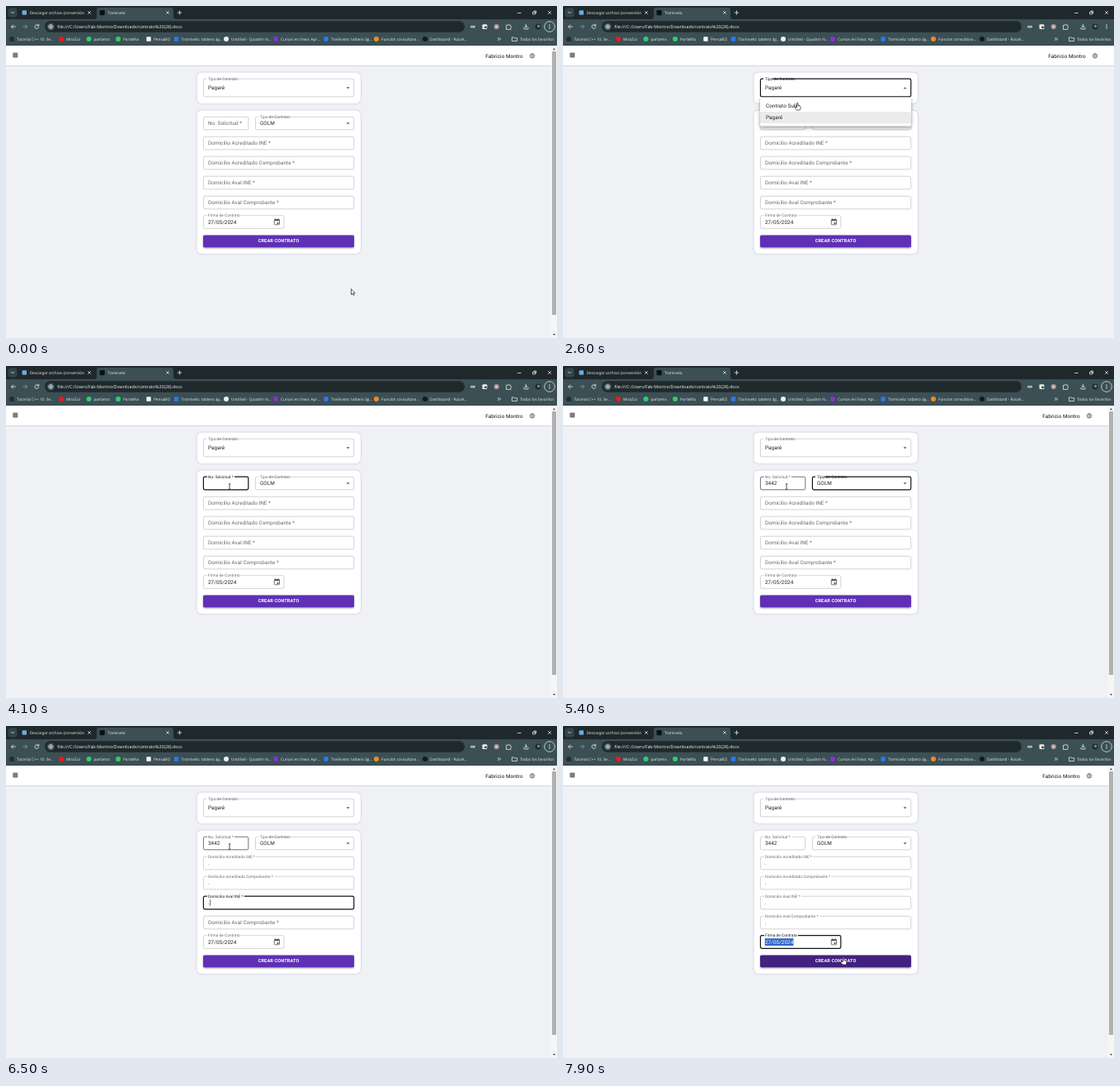
Animation, 668 px wide and 402 px high, one loop 8 s. Source, as an HTML page:

```html
<!DOCTYPE html>
<html lang="es">
<head>
<meta charset="utf-8">
<title>Contrato</title>
<style>
  html, body { margin: 0; width: 100%; height: 100%; overflow: hidden; background: #f0f1f5; }
  svg { display: block; width: 100%; height: 100%; }
  text { font-family: Roboto, sans-serif; letter-spacing: .0094em; text-rendering: geometricPrecision; white-space: pre; }
  .chrome text { font-family: "Open Sans", "Noto Sans", sans-serif; letter-spacing: 0; }
  .line { fill: none; stroke: #e8eded; stroke-width: .8; stroke-linecap: round; stroke-linejoin: round; }
  .card { fill: #fff; filter: drop-shadow(0 0 1.2px #9aa3b8aa); }
  .menu { fill: #fff; filter: drop-shadow(0 2px 2px #0006); }
  .button { filter: drop-shadow(0 1px 1px #0006); }
  .halo { paint-order: stroke; stroke: #fff; stroke-width: 3px; stroke-linejoin: round; }
  .pointer { fill: #fff; stroke: #222; stroke-width: .7; stroke-linejoin: round; }
</style>
</head>
<body>
<svg viewBox="0 0 668 402">
  <g class="chrome" id="chrome"></g>
  <g id="page"></g>
</svg>
<script>
const LOOP = 8000, STEP = 100;
const BODY = 6.33, SMALL = 4.75;

const text = (x, y, str, size, fill, extra = '') =>
  `<text x="${x}" y="${y}" font-size="${size}" fill="${fill}" ${extra}>${str}</text>`;
const rect = (x, y, w, h, fill, extra = '') =>
  `<rect x="${x}" y="${y}" width="${w}" height="${h}" fill="${fill}" ${extra}/>`;
const circle = (x, y, r, fill, extra = '') =>
  `<circle cx="${x}" cy="${y}" r="${r}" fill="${fill}" ${extra}/>`;
const line = (d, extra = '') => `<path class="line" d="${d}" ${extra}/>`;
const cross = (x, y, r) => line(`M${x - r} ${y - r}l${2 * r} ${2 * r}m0 ${-2 * r}l${-2 * r} ${2 * r}`);
const dots = (x, y, dx, dy, fill) =>
  [-1, 0, 1].map(i => circle(x + i * dx, y + i * dy, .65, fill)).join('');
const within = (t, span) => !!span && t >= span[0] && t < span[1];
const clamp = v => Math.max(0, Math.min(1, v));
const mix = (a, b, k) => a + (b - a) * k;

// Browser window

const bookmarks = [
  [7, 'Tutorial C++ 10. Se...', '#1f2b35', 1],
  [67, 'MiraZul', '#f01818'],
  [100.5, 'parlamix', '#2ad366'],
  [136, 'ParlaMix', '#2ad366'],
  [173, 'PensaBO', '#f4f4f4', 1],
  [206.5, 'Tramivelo: tablero ág...', '#2979f2', 1],
  [267, 'Untitled - Quadrin N...', '#f0f0f0'],
  [327, 'Cursos en línea: Apr...', '#8b2ee0', 1],
  [388, 'Tramivelo: tablero ág...', '#2979f2', 1],
  [449, 'Funcion consultora...', '#f08a24'],
  [508, 'Dashboard - RutaK...', '#16191b'],
];

function drawChrome() {
  const ink = '#e8eded';
  const mark = ([x, label, color, square]) =>
    (square ? rect(x - 2.7, 37.3, 5.4, 5.4, color, 'rx=".8"') : circle(x, 40, 3, color)) +
    text(x + 6, 41.7, label, 4.75, ink);
  return [
    rect(0, 0, 668, 17, '#1f282b'),
    rect(0, 16, 668, 32, '#3b4f54'),
    rect(2.5, 2.5, 11, 11, '#33454a', 'rx="3"'),
    line('M6.4 7.2l1.6 1.6l1.6-1.6'),
    rect(19.5, 5.2, 5.5, 5.5, '#6fa8dc', 'rx="1"'),
    text(28.5, 9.9, 'Descargar archivo (conversión', 4.75, ink),
    cross(101, 8, 1.4),
    '<path d="M107 16q3 0 3-3V5q0-3 3-3h87q3 0 3 3v8q0 3 3 3z" fill="#3b4f54"/>',
    rect(113.5, 5, 6.2, 6.2, '#0d1012', 'rx="1"'),
    text(123, 9.9, 'Tramivelo', 4.75, ink),
    cross(196, 8, 1.4),
    line('M208.3 8h4.4m-2.2-2.2v4.4'),
    line('M620.5 8.5h3.6'),
    line('M639 7.3h2.6v2.6h-2.6zM640 7v-.9h2.7v2.7h-.8', 'stroke-width=".6"'),
    cross(659, 8, 1.6),
    line('M11.5 25h-5m2.2-2.2l-2.2 2.2l2.2 2.2'),
    line('M20.5 25h5m-2.2-2.2l2.2 2.2l-2.2 2.2', 'opacity=".45"'),
    line('M39.4 23.8a2.4 2.4 0 1 0 .2 2M39.7 22v2h-2'),
    rect(47, 18.3, 509, 13.4, '#1f292c', 'rx="6.7"'),
    circle(54.3, 25, 4.6, '#3b4f54'),
    circle(54.3, 25, 2.4, 'none', 'stroke="#e8eded" stroke-width=".6"'),
    line('M52 25h4.6M54.3 22.7v4.6', 'stroke-width=".4"'),
    text(62.3, 26.9, 'file:///C:/Users/Fab-Montro/Downloads/contrato%20(28).docx', 5.31, '#f3f6f6'),
    rect(563, 23.7, 6, 2.8, '#a9b5b8', 'rx="1"'),
    rect(577.5, 22.3, 5.8, 5.6, '#eef1f1', 'rx="1"'),
    rect(580.2, 24.6, 2.4, 2.4, '#2a3639'),
    circle(594.7, 25, 3.1, '#a99a92'),
    circle(594.7, 25, 1.3, '#d9d2cc'),
    line('M606.8 23.3h1.6a1 1 0 0 1 2 0h1.5v1.7a1 1 0 0 1 0 1.8v1.5h-5.1z', 'stroke-width="1"'),
    line('M630.5 22v3.8m-1.7-1.6l1.7 1.7l1.7-1.7M628 26.2v1.7h5v-1.7'),
    circle(645, 25, 3.4, '#222b2e'),
    circle(645.5, 24.4, 1.6, '#8b8378'),
    dots(659, 25, 0, 2, ink),
    ...bookmarks.map(mark),
    line('M596.3 38.6l1.4 1.4l-1.4 1.4m2-2.8l1.4 1.4l-1.4 1.4', 'stroke-width=".7"'),
    line('M613.8 38h2l.8.8h3v3.6h-5.8z', 'stroke-width=".7"'),
    text(623, 41.7, 'Todos los favoritos', 4.75, ink),
  ].join('');
}

// Form

const fields = [
  { x: 239, y: 88, w: 183, h: 22, label: 'Tipo de Contrato', value: 'Pagaré', select: true,
    focus: [2200, 3600], hover: [1900, 3100] },
  { x: 239, y: 134, w: 55, label: 'No. Solicitud *', focus: [3600, 5300], hover: [3300, 7500],
    typed: [[4400, '3'], [4600, '34'], [4900, '344'], [5000, '3442']] },
  { x: 302, y: 134, w: 120, label: 'Tipo de Contrato', value: 'GOLM', select: true, focus: [5300, 5700] },
  { x: 239, y: 158, w: 183, label: 'Domicilio Acreditado INE *', focus: [5700, 6000], typed: [[5900, '.']] },
  { x: 239, y: 182, w: 183, label: 'Domicilio Acreditado Comprobante *', focus: [6000, 6300], typed: [[6200, '.']] },
  { x: 239, y: 206, w: 183, label: 'Domicilio Aval INE *', focus: [6300, 6600], typed: [[6500, '.']] },
  { x: 239, y: 230, w: 183, label: 'Domicilio Aval Comprobante *', focus: [6600, 7000], typed: [[6800, '.']] },
  { x: 239, y: 253.5, w: 98, label: 'Firma de Contrato', value: '27/05/2024', date: true, focus: [7000, LOOP] },
];
const caretOffset = { '': 0, '.': 1.8 };
const modal = [2200, 3000];

function drawField(f, t) {
  const { x, y, w, h = 16 } = f;
  const focused = within(t, f.focus), hovered = within(t, f.hover);
  const mid = y + h / 2, tx = x + 6;
  const edge = focused ? '#151515' : hovered ? '#505050' : '#c8c8c8';
  let out = rect(x + .4, y + .2, w - .6, h - .4, 'none',
    `rx="1.7" stroke="${edge}" stroke-width="${focused ? 1.2 : .8}"`);

  const raised = f.value ? 1 : clamp((t - f.focus[0] + STEP) / 300);
  const ink = focused ? '#151515' : '#686868';
  if (f.select) out += rect(x + 4, y - 1, 11, 2.4, '#fff');
  out += text(tx, mix(mid + 2.2, y + 1.6, raised), f.label, mix(BODY, SMALL, raised), ink,
    raised && !f.select ? 'class="halo"' : '');

  const entry = (f.typed || []).filter(([at]) => t >= at).pop();
  const value = f.value || (entry ? entry[1] : '');
  if (f.date && focused) out += rect(tx - .3, mid - 4.3, 34.7, 8.8, '#2f66c8');
  if (value) out += text(tx, mid + 2.2, value, BODY, f.date && focused ? '#fff' : '#222');
  if (f.typed && focused) {
    const since = t - (entry ? entry[0] : f.focus[0]);
    const cx = tx + .3 + (caretOffset[value] ?? value.length * 3.62);
    if (since % 1000 < 500) out += rect(cx, mid - 3.8, .6, 7.6, '#111');
  }
  if (f.select) {
    const flip = h > 16 && within(t, modal) ? -1 : 1;
    out += `<path d="M-2-1h4l-2 2z" fill="#555" transform="translate(${x + w - 7.3} ${mid + .3}) scale(1 ${flip})"/>`;
  }
  if (f.date) {
    out += rect(325.3, 258.6, 6.2, 6.2, 'none', 'rx=".6" stroke="#555" stroke-width=".8"') +
      rect(325.3, 258.4, 6.2, 1.8, '#555') + rect(328.6, 262, 1.9, 1.9, '#555') +
      line('M326.8 257.6v1M330 257.6v1', 'style="stroke:#555"');
  }
  return out;
}

function drawHeader(shift) {
  const teeth = [...Array(8)].map((_, i) =>
    `<path d="M0-2.3v-.9" stroke="#444" stroke-width="1.1" transform="rotate(${i * 45})"/>`).join('');
  return rect(0, 72, 668, .8, '#cfd1d6') + rect(0, 48, 668, 24, '#fff') +
    rect(8.3, 56.6, 6, 6, '#757575', 'rx=".8"') +
    rect(8.8, 58.3, 5, .4, '#a5a5a5') + rect(8.8, 60.5, 5, .4, '#a5a5a5') +
    text(581.3 + shift, 62.5, 'Fabricio Montro', BODY, '#111') +
    `<g transform="translate(${638 + shift} 60.3)">${teeth}` +
    circle(0, 0, 2.2, 'none', 'stroke="#444" stroke-width=".7"') + circle(0, 0, .8, '#444') + '</g>';
}

const drawScrollbar = () => rect(661, 48, 7, 354, '#f6f6f6') +
  rect(662, 55, 5, 319, '#b0b0b0') +
  '<path d="M662.8 53l1.7-2l1.7 2zM662.8 397l1.7 2l1.7-2z" fill="#555"/>';

function drawMenu(t) {
  const alpha = Math.min(clamp((t - 2100) / 200), clamp((3100 - t) / 200));
  if (!alpha) return '';
  return `<g opacity="${alpha}">` +
    rect(239, 110.5, 183, 35, '#fff', 'class="menu" rx="1.6"') +
    rect(239, 128, 183, 14, '#ebebeb') +
    text(246, 122.8, 'Contrato Sube', BODY, '#222') +
    text(246, 137.2, 'Pagaré', BODY, '#222') + '</g>';
}

// Pointer: time, x, y of the hot spot

const route = [
  [0, 418.5, 342.5], [400, 417.5, 323], [1000, 417.5, 323], [1400, 446, 225], [1800, 424, 124],
  [1900, 291.8, 104.6], [2300, 290, 105.5], [2600, 284.2, 117], [2800, 272, 132], [3000, 268, 134],
  [3300, 270, 143], [3600, 271, 146], [7400, 271, 146], [7500, 282, 168], [7700, 327, 250],
  [7800, 338, 277], [7900, 340, 280], [LOOP, 340, 280],
];
const shapes = {
  arrow: 'M0 0v7l1.6-1.4l1.1 2.3l1-.5l-1-2.2h2.1z',
  hand: 'M-.7.6q.7-1 1.4 0v3l2.5.6q.9.3.7 1.4l-.5 2.6q-.2.8-.8.8h-3q-.8 0-1.2-.7l-1.8-2.6q.2-1.1 1.3-.5l1.4.8z',
};

function drawPointer(t) {
  const i = route.findIndex(p => p[0] > t);
  const [a, b] = [route[i - 1], route[i]];
  const k = (t - a[0]) / (b[0] - a[0]);
  const at = `transform="translate(${mix(a[1], b[1], k)} ${mix(a[2], b[2], k)})"`;
  if (t >= 3200 && t < 7700) {
    return `<path d="M-1.3-3.4q1.3 0 1.3.8v5.2q0 .8-1.3.8M1.3-3.4q-1.3 0-1.3.8m0 5.2q0 .8 1.3.8" fill="none" stroke="#222" stroke-width=".8" ${at}/>`;
  }
  const hand = (t >= 1900 && t < 3200) || t >= 7800;
  return `<path class="pointer" d="${hand ? shapes.hand : shapes.arrow}" ${at}/>`;
}

function drawPage(t) {
  const open = within(t, modal);
  const pressed = t >= 7800;
  return [
    rect(0, 48, 668, 354, '#f0f1f5'),
    drawHeader(open ? 7 : 0),
    open ? '' : drawScrollbar() +
      circle(659, 25, 6.3, 'none', 'stroke="#c3dbe2" stroke-width=".9"'),
    rect(231.5, 80.5, 198.5, 37.5, '#fff', 'class="card" rx="6"'),
    rect(231.5, 126.5, 198.5, 173.5, '#fff', 'class="card" rx="6"'),
    ...fields.map(f => drawField(f, t)),
    rect(239, 277.5, 183, 14.7, pressed ? '#43217f' : '#5f30b5', 'class="button" rx="1.6"'),
    text(330.6, 286.4, 'CREAR CONTRATO', 5.54, '#fff',
      'text-anchor="middle" font-weight="600" style="letter-spacing:.0286em"'),
    drawMenu(t),
    drawPointer(t),
  ].join('');
}

document.getElementById('chrome').innerHTML = drawChrome();
const page = document.getElementById('page');
const start = performance.now();
let shown = -1;

function tick() {
  const t = Math.floor(((performance.now() - start) % LOOP) / STEP) * STEP;
  if (t !== shown) page.innerHTML = drawPage(shown = t);
  requestAnimationFrame(tick);
}
tick();
</script>
</body>
</html>
```
